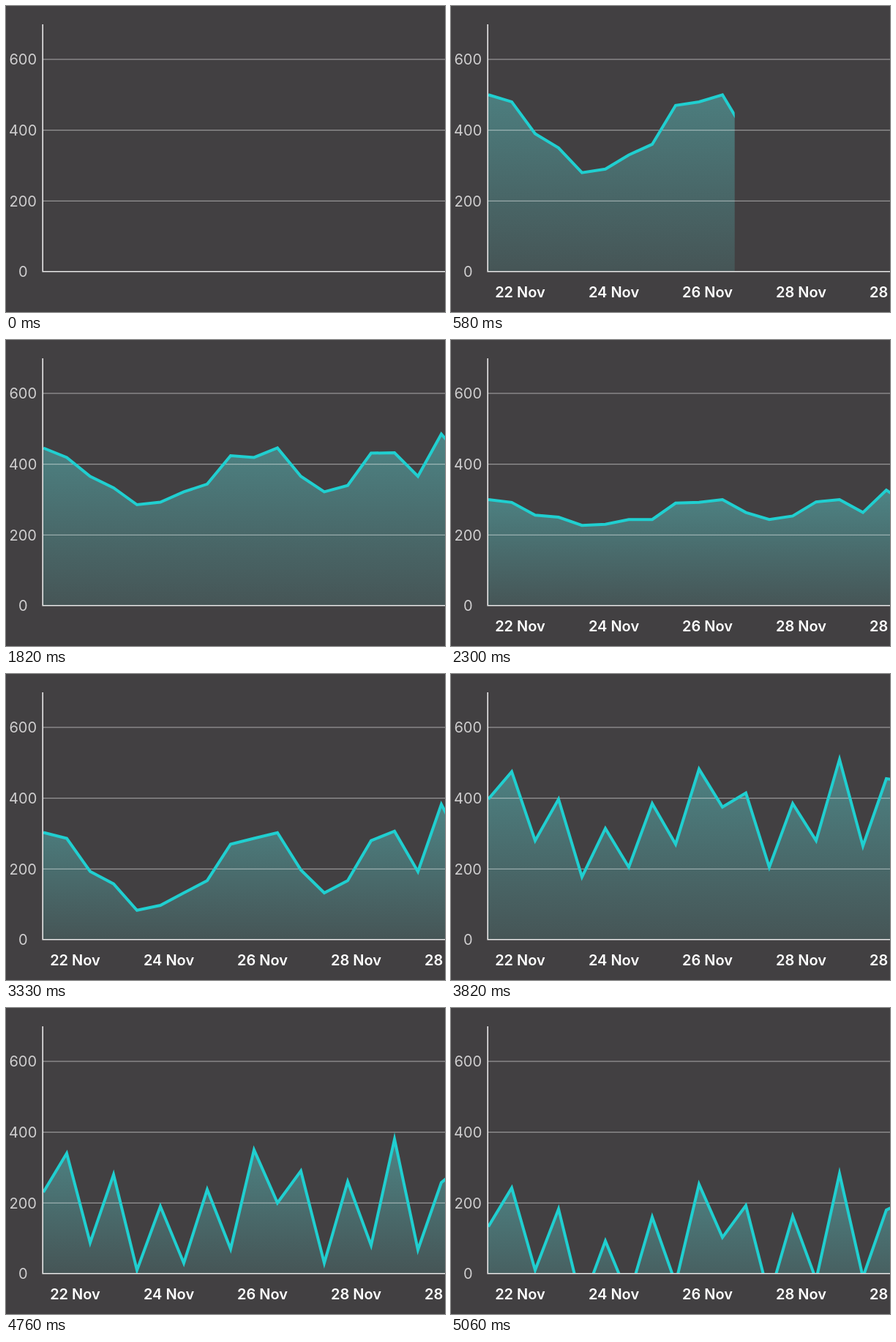
These frames come from a looping animation (600x418 px, 5120 ms). An HTML page:

```html
<!DOCTYPE html>
<html lang="en">
<head>
<meta charset="utf-8">
<title>Animated area chart</title>
<style>
  html, body { margin: 0; width: 100%; height: 100%; overflow: hidden; background: #424042; }
  svg { display: block; width: 600px; height: 418px; }
  text { font: 20px Inter, "Liberation Sans", sans-serif; text-anchor: middle; fill: #d0cfd0; }
  #dates text { font-weight: 600; fill: #fff; }
  #grid { stroke: #fff; stroke-opacity: .44; stroke-width: 1.2; }
  #line { fill: none; stroke: #20cfd0; stroke-width: 4; stroke-miterlimit: 10; }
  #axes { fill: none; stroke: #e6e6e6; stroke-width: 1.6; }
</style>
</head>
<body>
<svg viewBox="0 0 600 418">
  <defs>
    <linearGradient id="shade" x1="0" y1="0" x2="0" y2="1">
      <stop offset="0" stop-color="#4d8485"/>
      <stop offset="1" stop-color="#465556"/>
    </linearGradient>
    <clipPath id="plot"><rect id="wipe" x="50.5" y="0" width="0" height="363"/></clipPath>
  </defs>
  <path id="area" fill="url(#shade)" clip-path="url(#plot)"/>
  <g id="grid"></g>
  <path id="line" clip-path="url(#plot)"/>
  <path id="axes" d="M50.2 25V362.8H600"/>
  <g id="scale"></g>
  <g id="dates"></g>
</svg>
<script>
const LOOP = 5120, LEFT = 51, STEP = 32, BASE = 363;
const $ = id => document.getElementById(id);
const yOf = v => BASE - v * 0.4835;
const clamp = u => Math.min(1, Math.max(0, u));
const ramp = (t, from, to) => clamp((t - from) / (to - from));

// Data sets
const low = [300, 280, 190, 150, 80, 90, 130, 160, 270, 280, 300, 190, 130, 160, 280, 300, 190, 380, 250];
const high = low.map(v => v + 200);
const flat = low.map(() => 300);
const jagged = [430, 540, 310, 480, 210, 390, 230, 460, 270, 550, 400, 490, 230, 460, 280, 580, 290, 480, 510];
const sunk = jagged.map(v => v - 300);

// Some points run slightly ahead of the rest
const moves = [
  { to: flat, at: 1655, dur: 460, lead: 20, early: [1, 3, 9, 13, 15, 17] },
  { to: low, at: 2115, dur: 465, lead: 20, early: [1, 2, 7, 9] },
  { to: jagged, at: 3232, dur: 902, lead: 0, early: [] },
  { to: sunk, at: 4221, dur: 902, lead: 44, early: [2, 7, 16, 17] }
];

// Same curve as cubic-bezier(.42, 0, .58, 1)
function easeInOut(u) {
  let a = 0, b = 1, s = u;
  for (let i = 0; i < 24; i++) {
    s = (a + b) / 2;
    const r = 1 - s;
    if (1.26 * s * r * r + 1.74 * s * s * r + s * s * s < u) a = s; else b = s;
  }
  return s * s * (3 - 2 * s);
}

function valueAt(i, t) {
  let v = high[i];
  for (const m of moves) {
    const time = t + (m.early.includes(i) ? m.lead : 0);
    if (time <= m.at) break;
    v += (m.to[i] - v) * easeInOut(clamp((time - m.at) / m.dur));
  }
  return v;
}

function dateOpacity(t) {
  if (t < 1450) return ramp(t, 60, 260);
  return t < 1900 ? 1 - ramp(t, 1450, 1640) : ramp(t, 2000, 2180);
}

function label(parent, x, y, str) {
  parent.insertAdjacentHTML("beforeend", `<text x="${x}" y="${y}">${str}</text>`);
}

for (const v of [0, 200, 400, 600]) {
  const y = yOf(v);
  label($("scale"), 23.2, y + 7.2, v);
  if (v) $("grid").insertAdjacentHTML("beforeend", `<path d="M51 ${y}H600"/>`);
}
["22 Nov", "24 Nov", "26 Nov", "28 Nov", "28 Nov"]
  .forEach((str, i) => label($("dates"), 94.5 + i * 128, 398, str));

function draw(t) {
  const points = high.map((_, i) => `${LEFT + i * STEP} ${yOf(valueAt(i, t)).toFixed(2)}`);
  const path = "M" + points.join("L");
  $("line").setAttribute("d", path);
  $("area").setAttribute("d", `${path}V${BASE}H${LEFT}Z`);
  $("wipe").setAttribute("width", Math.min(550, Math.max(0, t - 30) * 0.612));
  $("dates").setAttribute("opacity", dateOpacity(t));
}

const start = performance.now();
function tick() {
  draw((performance.now() - start) % LOOP);
  requestAnimationFrame(tick);
}
draw(0);
requestAnimationFrame(tick);
</script>
</body>
</html>
```
